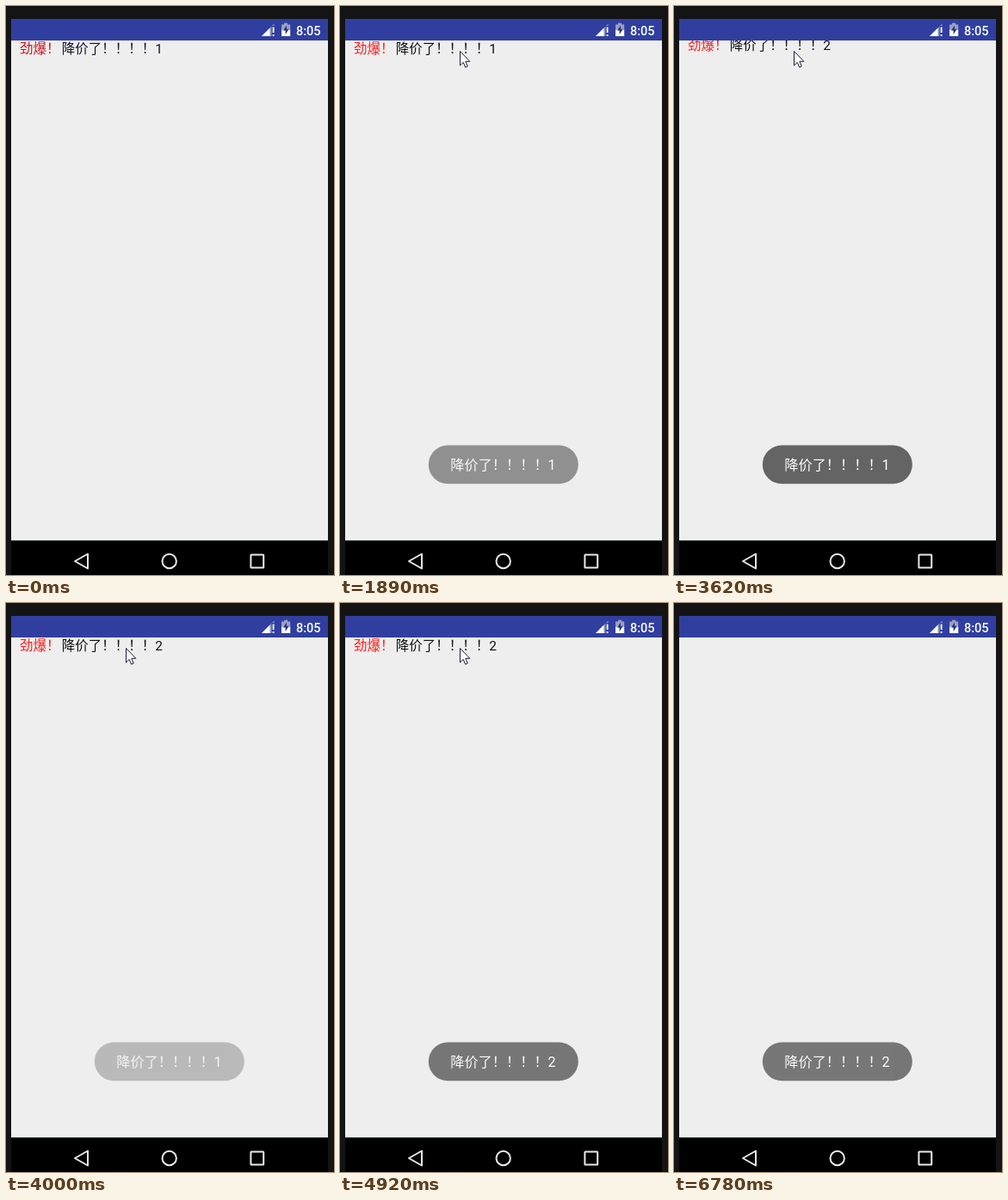
Recreate the animation shown at these times as an HTML page. Size 381 by 660 pixels, loop 6.84 s.

```html
<!DOCTYPE html>
<html lang="zh-CN">
<head>
<meta charset="utf-8">
<style>
html, body { margin: 0; height: 100%; overflow: hidden; background: #141414; }
svg { display: block; }
text { font-family: Roboto, "Noto Sans CJK SC", sans-serif; white-space: pre; }
.bang { font-family: "Noto Sans CJK JP", "Noto Sans CJK", sans-serif; }
</style>
</head>
<body>
<svg width="381" height="660" viewBox="0 0 381 660">
  <defs>
    <clipPath id="row"><rect x="6" y="40" width="368" height="18"/></clipPath>
  </defs>
  <rect width="381" height="660" fill="#141414"/>
  <rect x="6" y="15" width="368" height="25" fill="#303f9f"/>
  <rect x="6" y="40" width="368" height="580" fill="#eee"/>
  <rect x="6" y="619" width="368" height="1" fill="#c9dccb"/>
  <rect x="6" y="620" width="368" height="40"/>

  <!-- status icons -->
  <path d="M297 35 L311.5 20.5 V23 H308.5 V35Z" fill="#8b93c6"/>
  <path d="M297 35 L306.5 25.5 V35Z" fill="#fff"/>
  <path d="M309.7 24.5h1.8v6.5h-1.8zM309.7 33h1.8v2h-1.8z" fill="#fff"/>
  <path d="M320 21.5h3v-1.7h4.2v1.7h3v6h-10.2z" fill="#9a9fc4"/>
  <path d="M320 27.5h10.2v7.5h-10.2z" fill="#fff"/>
  <path d="M326 22.5l-4 6h2.6v4.5l4-6.2h-2.6z" fill="#26327f"/>
  <text x="337" y="33.5" font-size="14.5" font-weight="500" fill="#fff">8:05</text>

  <!-- navigation buttons -->
  <g fill="none" stroke="#e8e8e8" stroke-width="2" stroke-linejoin="round">
    <path d="M80 644 L95 635.5 V652.5Z"/>
    <circle cx="189.7" cy="644" r="8.2"/>
    <rect x="284.4" y="636.6" width="14.8" height="14.8" rx=".5"/>
  </g>

  <g clip-path="url(#row)">
    <g id="ticker" font-size="15.5">
      <text id="hot" x="16" y="55">劲爆<tspan class="bang">！</tspan></text>
      <text id="news" x="64.8" y="55">降价了<tspan class="bang">！！！！</tspan><tspan class="digit">1</tspan></text>
    </g>
  </g>

  <g id="toast">
    <rect x="102.8" y="509.5" width="174" height="44.8" rx="22.4" fill="#646464"/>
    <text x="128.3" y="538" font-size="16.2" fill="#fff">降价了<tspan class="bang">！！！！</tspan><tspan class="digit">1</tspan></text>
  </g>

  <path id="cursor" d="M.5 .5V17L4.2 13.4 6.7 19.1 9.2 18 6.8 12.3H11.8Z" fill="#fff" stroke="#1c1c38"/>
</svg>
<script>
const LOOP = 6840, STEP = 77.5, PHASE = 40;
const $ = id => document.getElementById(id);
const [newsDigit, toastDigit] = document.querySelectorAll('.digit');
const clamp = v => Math.min(1, Math.max(0, v));
const mix = (a, b, k) => a + (b - a) * k;

// The line rests, slides out below, then the next one slides in from above.
function tickerOffset(t) {
  const phase = (t - 1840 + 3940) % 3940 / 1000;
  return 17 * (phase < 1 ? phase : phase < 2 ? phase - 2 : 0);
}

function toastOpacity(t, start) {
  const enter = clamp((t - start) / 500), leave = clamp((t - start - 1990) / 500);
  return enter * (2 - enter) * (1 - leave * leave);
}

function cursorPosition(t) {
  if (t < 350 || t > 5900) return null;
  if (t < 3000) {
    const left = 1 - clamp((t - 350) / 930);
    return [mix(139, 325, left ** 3), mix(52, 630, left ** 2.38)];
  }
  const gone = clamp((t - 5388) / 465);
  return [mix(139, 296, gone ** 1.85), mix(52, 553, gone ** 1.33)];
}

function draw(t) {
  const fresh = t < 1650;
  $('hot').setAttribute('fill', fresh ? '#c8161c' : '#ff1c1c');
  $('news').setAttribute('fill', fresh ? '#17122c' : '#111');
  $('ticker').setAttribute('transform', `translate(0 ${tickerOffset(t)})`);
  newsDigit.textContent = t < 2840 ? 1 : 2;

  const second = t > 4400;
  toastDigit.textContent = second ? 2 : 1;
  $('toast').setAttribute('opacity', toastOpacity(t, second ? 4605 : 1608));

  const at = cursorPosition(t);
  $('cursor').setAttribute('visibility', at ? 'visible' : 'hidden');
  if (at) $('cursor').setAttribute('transform', `translate(${at.map(Math.round)})`);
}

function tick() {
  const t = performance.now() % LOOP;
  draw(Math.max(0, Math.floor((t - PHASE) / STEP + 0.1) * STEP + PHASE));
  requestAnimationFrame(tick);
}
tick();
</script>
</body>
</html>
```
